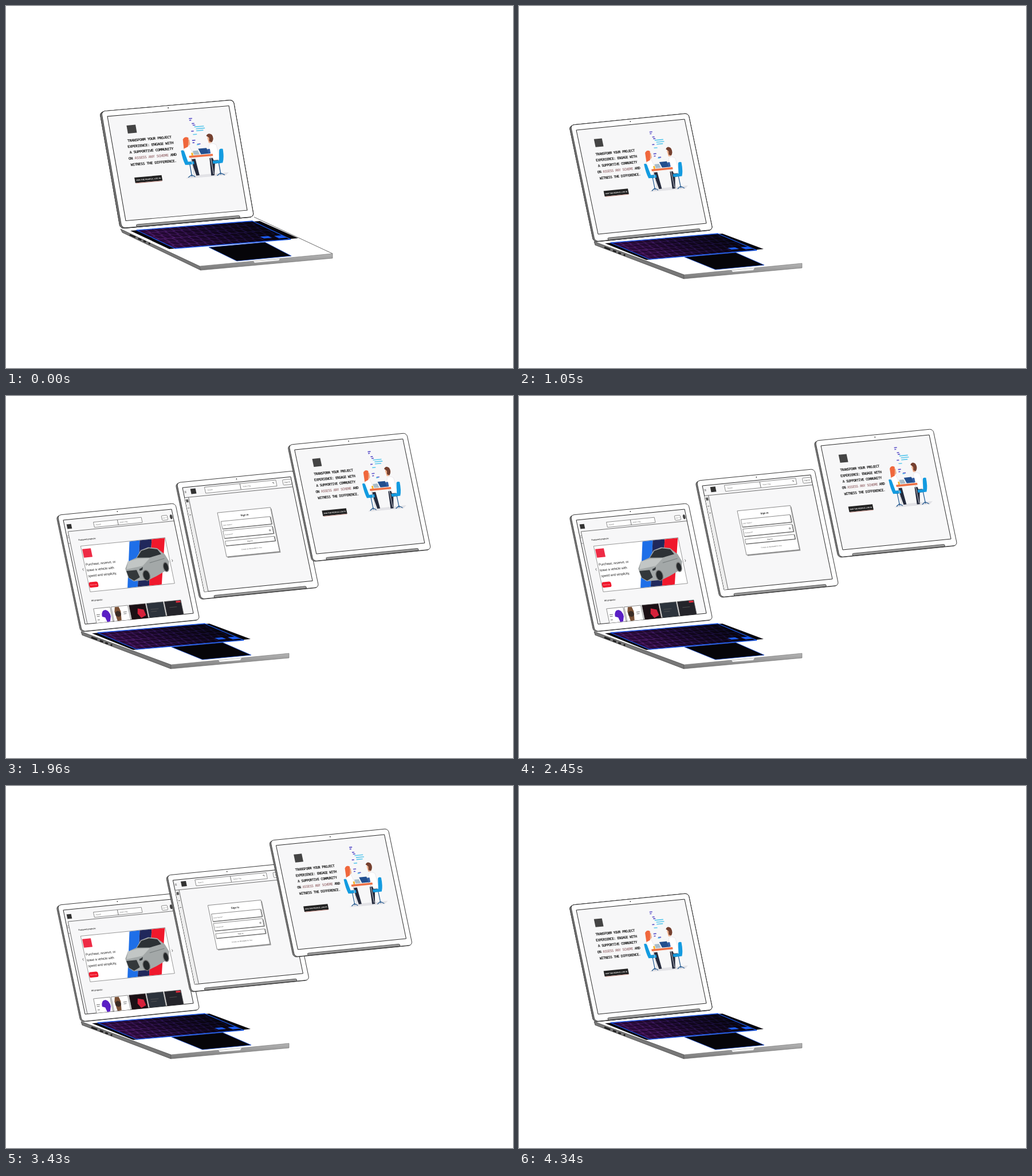
Animation, 885 px wide and 633 px high, one loop 4.41 s. Source, as an HTML page:

```html
<!DOCTYPE html>
<html lang="en">
<head>
<meta charset="utf-8">
<title>Laptop with three screens</title>
<style>
  html, body { margin: 0; width: 100%; height: 100%; overflow: hidden; background: #fff; }
  svg { display: block; width: 885px; height: 633px; }
  text { font-family: "Liberation Sans", Arial, sans-serif; text-rendering: geometricPrecision; fill: #222; }
  .mid { text-anchor: middle; }
  .head text { font: bold 6.2px "Noto Sans Mono", monospace; letter-spacing: -.6px; }
  .tiny { font-size: 3px; fill: #666; }
  .bold { font-weight: bold; }
  .line { fill: none; stroke: #555; stroke-width: .8; }
  .field { fill: #fff; stroke: #777; stroke-width: .8; }
</style>
</head>
<body>
<svg viewBox="0 0 885 633">
  <defs>
    <linearGradient id="keyFill"><stop stop-color="#2c0a3c"/><stop offset=".55" stop-color="#12061f"/><stop offset="1" stop-color="#06040c"/></linearGradient>
    <linearGradient id="keyGap" gradientUnits="userSpaceOnUse" x1="0" y1="0" x2="200" y2="0">
      <stop stop-color="#7a2f9c"/><stop offset=".5" stop-color="#3d1c74"/><stop offset="1" stop-color="#14144a"/>
    </linearGradient>
    <linearGradient id="metal" x2="0" y2="1"><stop stop-color="#b5b5b5"/><stop offset="1" stop-color="#777"/></linearGradient>
    <clipPath id="screenClip"><path d="M0 0H190V182H0Z"/></clipPath>

    <g id="lid">
      <rect x="-10.5" y="-8.5" width="208" height="203" rx="6" fill="#858585" stroke="#333" stroke-width=".8"/>
      <rect x="-8" y="-9.5" width="206.5" height="203.5" rx="6" fill="#fff" stroke="#333" stroke-width=".9"/>
      <rect width="190" height="182" fill="#f7f7f8" stroke="#222" stroke-width=".9"/>
      <circle cx="96" cy="-5.6" r=".9" fill="#222"/>
    </g>
    <rect id="bar" x="15" y="190" width="162" height="4.2" rx="2" fill="url(#metal)" stroke="#333" stroke-width=".8"/>
  </defs>

  <g stroke-linejoin="round">
    <polygon id="top" fill="#fff"/>
    <polyline id="edge" fill="none" stroke="#444" stroke-width=".8"/>
    <polygon id="side" fill="#777" stroke="#444" stroke-width=".8"/>
    <polygon id="front" fill="url(#metal)" stroke="#666" stroke-width=".6"/>
    <polygon id="notch" fill="#f4f4f4"/>
    <polyline id="ports" stroke="#222" stroke-width="3" stroke-dasharray="11 5 6 4 5 5 3 20"/>
    <polygon id="deck" fill="#08060c"/>
    <g id="keys">
      <rect width="200" height="100" fill="url(#keyFill)"/>
      <path id="grid" fill="none" stroke="url(#keyGap)" stroke-width="1.3"/>
      <path d="M163 76h14v10h-14zM186 78h13v13h-13z" fill="#1d5cf0"/>
      <rect width="200" height="100" fill="none" stroke="#1d5cf0" stroke-width="1.3" vector-effect="non-scaling-stroke"/>
    </g>
    <polygon id="pad" fill="#060509" stroke="#1d4fd0" stroke-width=".8"/>
  </g>

  <g id="catalog">
    <use href="#lid"/>
    <g clip-path="url(#screenClip)">
      <path class="line" d="M4 182V20.5H190"/>
      <path class="line" d="M1 28h2m-2 3h2m-2 10h2"/>
      <rect x="4" y="8" width="8" height="8" fill="#333"/>
      <rect class="field" x="51" y="8.7" width="84" height="9"/>
      <path class="line" d="M93 9v9"/>
      <text class="tiny" x="54" y="14.5">Search</text><text class="tiny" x="96" y="14.5">Select Tag</text>
      <rect class="field" x="170" y="9.5" width="10" height="8" rx="1"/>
      <text class="tiny mid" x="175" y="14.3" style="font-size:2.4px">Sign In</text>
      <ellipse cx="186.5" cy="13" rx="2.2" ry="4" fill="#444"/>
      <text class="bold" x="19" y="38" font-size="3.5">Featured projects:</text>
      <rect x="20.5" y="47.5" width="148" height="80" fill="#fff" stroke="#888" stroke-width=".8"/>
      <path d="M106 48h18l-20 79H86z" fill="#1e6fe8"/>
      <path d="M124 48h21l-21 79h-20z" fill="#20285c"/>
      <path d="M145 48h23l-22 79h-22z" fill="#f0182c"/>
      <g>
        <path d="M89 94 96 82 112 77 122 65 136 61 151 64 162 76 167 89 163 102 140 112 126 117 99 117 91 110Z" fill="#a3a8a8"/>
        <path d="M113 77 123 66 137 63 151 66 156 75 135 79Z" fill="#2c3135"/>
        <path d="M96 82 113 79 135 80 120 92 91 95Z" fill="#c2c6c5"/>
        <path d="M90 98h18l3 13-11 5-8-6zM113 97l7-3-2 5-5 1z" fill="#33383b"/>
        <g fill="#24282a" stroke="#777" stroke-width="1.4">
          <ellipse cx="123" cy="109" rx="6" ry="9"/><ellipse cx="159.500" cy="98" rx="4.500" ry="8"/>
        </g>
        <path d="M133 88 160 83" stroke="#777d7e"/>
      </g>
      <rect x="22" y="53" width="15" height="15" fill="#ee2b45"/>
      <g font-size="5.7" letter-spacing="-.1">
        <text x="22.500" y="82">Purchase, reserve, or</text>
        <text x="22.500" y="92">lease a vehicle with</text>
        <text x="22.500" y="102">speed and simplicity.</text>
      </g>
      <rect x="21" y="111" width="16" height="9.500" rx="3" fill="#f0182c"/>
      <text class="tiny mid" x="29" y="116.700" style="font-size:2.6px;fill:#fff">Book now</text>
      <path class="line" d="M17 86l-1.500 2 1.500 2M172 86l1.500 2-1.500 2"/>
      <text class="bold" x="19" y="144" font-size="3.5">All projects:</text>
      <g stroke="#666" stroke-width=".7">
        <path d="M20 157H49V185H20ZM51 157H80V185H51Z" fill="#fff"/>
        <path d="M82 157H111V185H82Z" fill="#1b1015"/>
        <path d="M113 157H142V185H113Z" fill="#2c333c"/>
        <path d="M144 157H173V185H144Z" fill="#24242a"/>
      </g>
      <path d="M32 172q0-11 8-11 7 2 7 12l-3 9h-5l-2-8z" fill="#5a1fc4"/>
      <path d="M23 168h6m-6 3h5m-5 6h4M70 168h6m-6 3h5m43-3h14m-14 4h10m23-4h13" class="line"/>
      <path d="M57 158h7l2 8-2 16h-7l-2-16z" fill="#7a5136"/><circle cx="60.500" cy="170" r="5" fill="#3a2c25"/>
      <path d="M96 164l10 3 2 10-9 4-5-8z" fill="#d6203a"/><path d="M164 158h8v3h-8z" fill="#e02a3c"/>
    </g>
  </g>

  <g id="login">
    <use href="#lid"/><use href="#bar"/>
    <g clip-path="url(#screenClip)">
      <path d="M0 18H7V182H0Z" fill="#eee"/>
      <path class="line" d="M7 182V17.500M0 17.500H190M2 7h3m-3 2h3"/>
      <path d="M1.500 21h4v5h-4z" fill="#555"/><path class="line" d="M2 36h3m-3 12h3"/>
      <rect x="13" y="3.500" width="9" height="9" fill="#333"/>
      <rect class="field" x="38" y="3" width="125" height="10.500"/>
      <path class="line" d="M100 3v10"/>
      <text class="tiny" x="42" y="9.500">Search</text><text class="tiny" x="104" y="9.500">Select Tag</text>
      <path class="line" d="M156 7h2.500v2"/>
      <rect class="field" x="174.500" y="4" width="15" height="9" rx="1"/>
      <text class="tiny mid bold" x="182" y="9.500">Sign In</text>
      <rect x="52.500" y="51" width="93" height="77" fill="#999"/>
      <rect class="field" x="51" y="49" width="93" height="77"/>
      <text class="mid bold" x="97" y="59" font-size="4.300">Sign In</text>
      <g class="field">
        <path d="M54 64.500H140V77.500H54ZM54 81H140V94H54ZM54 99H140V107H54Z"/>
      </g>
      <path d="M54 78H141V65M54 94.500H141V82M54 107.500H141V99" class="line"/>
      <text class="tiny" x="56" y="72.500">User Name*</text><text class="tiny" x="56" y="89">Password*</text>
      <circle class="line" cx="135" cy="88" r="1.200"/>
      <text class="tiny mid bold" x="97" y="104">Sign In</text>
      <text class="tiny mid" x="97" y="117">Create an <tspan class="bold">Account</tspan> for free</text>
    </g>
  </g>

  <g id="hero">
    <use href="#lid"/><use href="#bar"/>
    <rect x="27" y="18.500" width="14" height="14" fill="#444"/>
    <g class="head mid">
      <text x="58.500" y="47">TRANSFORM YOUR PROJECT</text>
      <text x="58.500" y="57.300">EXPERIENCE: ENGAGE WITH</text>
      <text x="58.500" y="67.300">A SUPPORTIVE COMMUNITY</text>
      <text x="58.500" y="77.800">ON <tspan fill="#a98487">ASSESS ANY SCHEME</tspan> AND</text>
      <text x="58.500" y="88.700">WITNESS THE DIFFERENCE.</text>
    </g>
    <rect x="25" y="109" width="42.500" height="9.500" fill="#222"/>
    <path d="M26 119H67" stroke="#c98b80" stroke-width=".8"/>
    <text class="tiny mid bold" x="46" y="115" style="fill:#fff">JOIN THE PEOPLE, LOG IN</text>
    <g id="team">
      <path d="M104 118.500 112 114H172L166 119Z" fill="#e2e2e6"/>
      <path d="M125 16h5m-5 3h3m0 6h4m-3 3h4m-8 10h4m-5 16h5m-5 4h3m4 3h5" stroke="#5a4fc8" stroke-width="1.600"/>
      <path d="M131 31h15m-13 3.500h14m-14 3.500h11m-17 6h6m-3 18h4" stroke="#5cc8ec" stroke-width="1.600"/>
      <path d="M114 94v22m-6 1 6-4 5 4M159 96v21m-6 1 6-4 6 4" fill="none" stroke="#245a91" stroke-width="1.200"/>
      <path d="M114 86h10l2 29h-5l-3-20h-8zM156 87h-10l-2 30h5l4-20h9z" fill="#252b3d"/>
      <path d="M109 64q4-5 9-1l3 11 8 3v3h-11l-1 10h-8zM160 65q-6-5-11-1l-3 11-8 3v3h12l2 10h10z" fill="#fff" stroke="#e1dfe5" stroke-width=".6"/>
      <path d="M104 70q4-2 5 2l3 18h9v5h-14q-3-9-3-25zM169 73q-5-2-6 2l-3 17h-10v5h15q4-9 4-24z" fill="#139be0"/>
      <path d="M116 52h4v8l-3 3zM148 51h5v10h-4z" fill="#efb08d"/>
      <path d="M110 51q4-6 9-2l-1 6-2 9-7 3z" fill="#f0673c"/>
      <path d="M147 48q4-6 9-1 3 7-2 13l-4-2 1-6z" fill="#75402f"/>
      <path d="M115 80H152V83.500H115Z" fill="#ed7045"/><path d="M118 84v31M148 84v31" stroke="#c8c9d0"/>
      <path d="M131 69h13l3 10h-13z" fill="#234f8e"/><path d="M122 72h8l2 7h-9z" fill="#a8bcc9"/>
      <path d="M119 75h3v5h-3z" fill="#f6b733"/><path d="M145 71h4v8h-4z" fill="#315ea5"/>
    </g>
  </g>
</svg>

<script>
const LOOP = 4410, STEP = 70;
const $ = id => document.getElementById(id);
const mix = ([a, b], k) => a.map((v, i) => v + (b[i] - v) * k);
const ease = x => (1 - Math.cos(Math.PI * Math.min(1, Math.max(0, x)))) / 2;

// Each pair holds the pose before and after the laptop turns.
const outlines = {
  top:   [[200,390, 433,369, 570,433, 338,455], [131,412, 337,391, 494,450, 288,470]],
  edge:  [[433,369, 570,433], [337,391, 494,450]],
  side:  [[200,390, 338,455, 340,462, 203,396], [131,412, 288,470, 288,477, 133,418]],
  front: [[338,455, 570,433, 570,441, 340,462], [288,470, 494,450, 494,458, 288,477]],
  notch: [[432,446, 478,442, 476,445, 434,449], [371,462, 411,458, 409,462, 373,465]],
  ports: [[216,400, 252,416], [149,422, 188,437]],
  deck:  [[217,393, 443,376, 510,406, 285,425], [150,415, 355,398, 427,425, 222,444]],
  pad:   [[354,422, 452,413, 498,437, 403,446], [289,439, 378,431, 428,453, 343,461]]
};
const keyPose = [[1.01, -.08, .67, .32, 228, 392], [.935, -.08, .68, .29, 160, 414]];
const lidPose = [[1.116, -.097, .176, 1.003, 177, 193], [.995, -.1, .209, 1, 100, 217]];
const travel = { catalog: [0, 0], login: [220, -60], hero: [427, -130] };

let grid = "";
for (let row = 0; row < 6; row++) {
  const y = row * 100 / 6;
  grid += `M0 ${y}H200`;
  for (let col = 1; col < 15; col++) grid += `M${(col - row % 3 * .3) * 13.8} ${y}v16.7`;
}
$("grid").setAttribute("d", grid);

const place = (id, m) => $(id).setAttribute("transform", `matrix(${m})`);

function draw(now) {
  const t = Math.floor(now % LOOP / STEP) * STEP;
  const turn = t < 500 ? Math.sin(Math.PI * t / 1000) : 1;
  const spread = ease((t - 1110) / 1000) - ease((t - 3195) / 1000);

  for (const id in outlines) $(id).setAttribute("points", mix(outlines[id], turn));
  $("edge").setAttribute("opacity", 1 - turn);
  place("keys", mix(keyPose, turn));
  for (const id in travel) {
    const m = mix(lidPose, turn);
    m[4] += travel[id][0] * spread;
    m[5] += travel[id][1] * spread;
    place(id, m);
  }
}

const start = performance.now();
function tick() {
  draw(performance.now() - start);
  requestAnimationFrame(tick);
}
tick();
</script>
</body>
</html>
```
